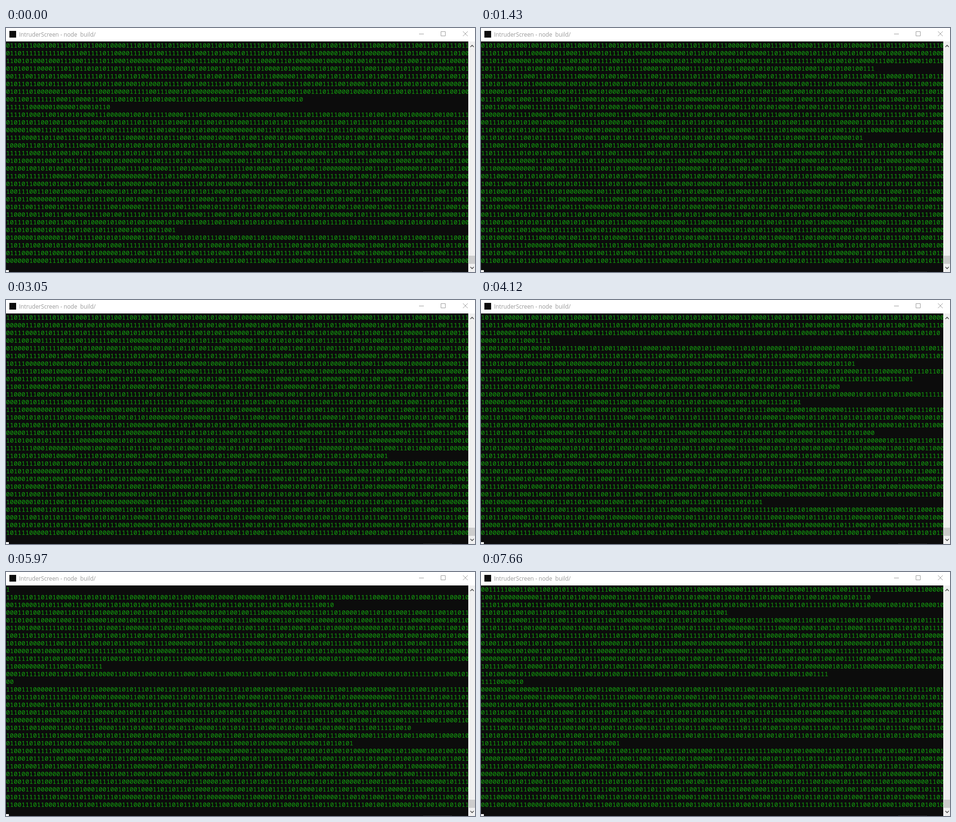
An HTML page for the animation above (7740 ms loop, 972x508 px).

```html
<!DOCTYPE html>
<html lang="en">
<head>
<meta charset="utf-8">
<title>Binary terminal</title>
<style>
  html, body { margin: 0; width: 100%; height: 100%; overflow: hidden; background: #0c0c0c; }
  #stage { position: relative; width: 972px; height: 508px; overflow: hidden; background: #0c0c0c; }
  #stage > * { position: absolute; margin: 0; }
  #bar { left: 0; top: 0; width: 972px; height: 28px; background: #fff; }
  #icon { left: 7px; top: 6px; width: 14px; height: 14px; background: #0c0c0c; }
  #title {
    left: 27px; top: 5px; white-space: pre; color: #999;
    font: 11.8px/16px "Open Sans", "Noto Sans", sans-serif;
  }
  #out {
    left: 0; top: 28px; width: 958px; height: 464px; overflow: hidden; color: #13a10e;
    font: 13.3333px/16px "Noto Sans Mono", "DejaVu Sans Mono", monospace;
    font-variant-ligatures: none;
  }
  #cursor { left: 0; top: 504px; width: 6px; height: 4px; background: #f2f2f2; }
  #scroll { left: 958px; top: 28px; width: 14px; height: 480px; background: #f0f0f0; }
  #thumb { left: 959px; top: 474px; width: 13px; height: 17px; background: #cdcdcd; }
  #lines { left: 0; top: 0; fill: none; }
</style>
</head>
<body>
<div id="stage">
  <div id="bar"></div>
  <div id="icon"></div>
  <div id="title">IntruderScreen - node  build/</div>
  <pre id="out"></pre>
  <div id="cursor"></div>
  <div id="scroll"></div>
  <div id="thumb"></div>
  <svg id="lines" width="972" height="508">
    <g stroke="#999">
      <path d="M856 12.5h10M901.5 7.5h9v9h-9z"/>
      <path d="M947 7l10 10M957 7l-10 10"/>
    </g>
    <path d="M962.5 39.5l3.5-3.5 3.5 3.5M962.5 497.5l3.5 3.5 3.5-3.5" stroke="#505050" stroke-width="1.6"/>
    <path d="M865 507.5h60" stroke="#333" stroke-dasharray="2 1"/>
  </svg>
</div>
<script>
const LOOP = 7740, COLS = 120, ROWS = 29;

// Runs of evenly spaced redraws: first time, last time, count
const runs = [
  [0, 0, 1], [70, 800, 11], [880, 1600, 10], [1660, 2050, 6], [2130, 2420, 5],
  [2500, 3050, 8], [3110, 3190, 2], [3280, 4030, 11], [4120, 4120, 1],
  [4180, 4890, 10], [4960, 5650, 10], [5740, 5970, 4], [6050, 6500, 7],
  [6580, 7350, 11], [7430, 7660, 4]
];

// Lines scrolled away by a given redraw: [redraw, lines]
const marks = [[0, 0], [11, 24], [27, 57], [40, 84], [54, 112], [78, 162], [100, 208]];

// Lines that end before the right edge: line -> length
const short = {
  7: 77, 8: 27, 24: 44, 33: 43, 41: 102, 50: 99,
  76: 108, 80: 25, 83: 65, 102: 99,
  114: 119, 115: 18, 118: 97, 120: 112, 121: 93, 123: 83, 127: 102, 136: 73,
  145: 58, 152: 106, 156: 31,
  162: 1, 164: 85, 172: 25, 174: 2, 180: 105, 182: 90,
  196: 70, 203: 47, 209: 101, 211: 64, 219: 90, 220: 11, 228: 36
};

const times = runs.flatMap(([from, to, n]) =>
  Array.from({ length: n }, (_, i) =>
    n > 1 ? Math.round((from + (to - from) * i / (n - 1)) / 10) * 10 : from));

function scrolled(step) {
  const i = Math.max(1, marks.findIndex(m => m[0] >= step));
  const [s0, l0] = marks[i - 1], [s1, l1] = marks[i];
  return Math.round(l0 + (l1 - l0) * (step - s0) / (s1 - s0));
}

let seed = 20177;
function random() {
  seed = (seed + 0x6d2b79f5) | 0;
  let t = Math.imul(seed ^ (seed >>> 15), 1 | seed);
  t = (t + Math.imul(t ^ (t >>> 7), 61 | t)) ^ t;
  return ((t ^ (t >>> 14)) >>> 0) / 4294967296;
}

const total = scrolled(times.length - 1) + ROWS;
const lines = Array.from({ length: total }, (_, row) =>
  Array.from({ length: short[row] || COLS }, () => random() < 0.5 ? "0" : "1").join(""));

const out = document.getElementById("out");
const start = performance.now();
let shown = -1;

function draw() {
  const t = (performance.now() - start) % LOOP;
  let step = times.length - 1;
  while (times[step] > t) step--;
  if (step !== shown) {
    const top = scrolled(step);
    out.textContent = lines.slice(top, top + ROWS).join("\n");
    shown = step;
  }
  requestAnimationFrame(draw);
}
draw();
</script>
</body>
</html>
```
